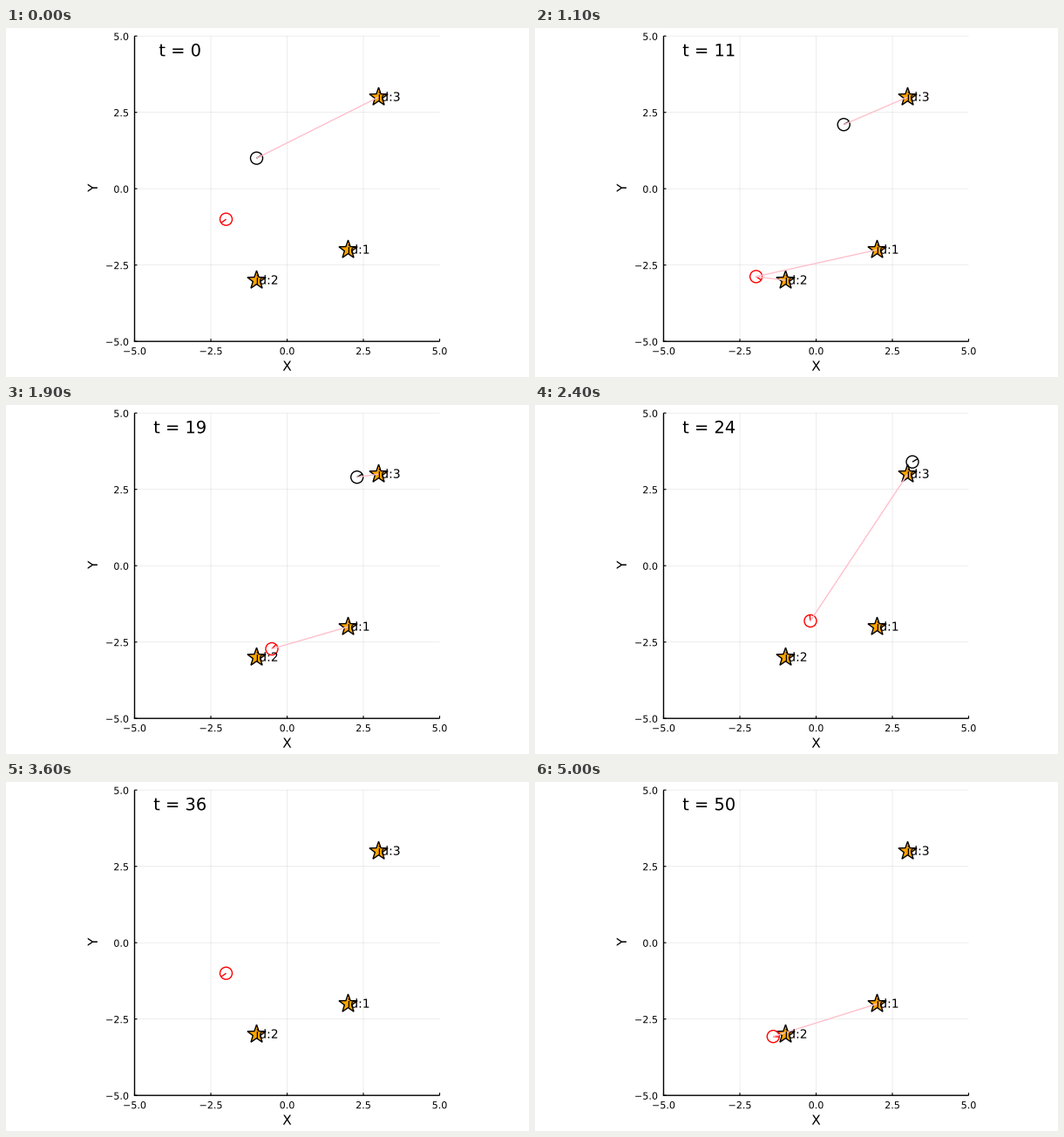
A matplotlib script that plays this animation: 600x400 px, repeating every 5100 ms.

```python
import math

import matplotlib.pyplot as plt
import numpy as np
from matplotlib.animation import FuncAnimation
from matplotlib.collections import LineCollection
from matplotlib.patches import Circle, PathPatch, Polygon, Rectangle
from matplotlib.textpath import TextPath
from matplotlib.transforms import Affine2D

plt.rcParams["font.family"] = "DejaVu Sans"

W, H, DPI = 600, 400, 100
FRAMES, INTERVAL = 51, 100
CX, CY, SCALE = 322.5, H - 184.2, 35      # pixel centre and pixels per unit
PT = DPI / 72
CAP = 0.729                               # digit height in em

LANDMARKS = [(2, -2), (-1, -3), (3, 3)]
RADIUS = 0.2
NEAR, FAR, HALF_VIEW = 0.5, 6.0, math.pi / 3

fig = plt.figure(figsize=(W / DPI, H / DPI), dpi=DPI, facecolor="white")
ax = fig.add_axes([0, 0, 1, 1])
ax.set_xlim(0, W)
ax.set_ylim(0, H)
ax.axis("off")


def px(x, y):
    return CX + SCALE * x, CY + SCALE * y


def text_path(s, x, y, pt, align=0.5, angle=0):
    """Outline of s, digits centred on y, anchored at share `align` of its width."""
    size = pt * PT

    def right(t):
        return TextPath((0, 0), t, size=size).get_extents().x1

    width = right(s + "|") - right("|")
    place = Affine2D().translate(-align * width, -CAP * size / 2)
    place.rotate_deg(angle).translate(x, y)
    return place.transform_path(TextPath((0, 0), s, size=size))


def add_text(*args, **kw):
    patch = PathPatch(text_path(*args, **kw), fc="black", lw=0, zorder=8)
    return ax.add_patch(patch)


def line(p, q, **kw):
    kw = {"color": "black", "lw": 1, "solid_capstyle": "butt", "snap": False, **kw}
    return ax.plot([p[0], q[0]], [p[1], q[1]], **kw)[0]


def number(v):
    return f"{v:.1f}".replace("-", "\u2212")


def draw_axes():
    left, bottom = px(-5, -5)
    right, top = px(5, 5)
    grid = {"lw": 0.5, "alpha": 0.1, "zorder": 1}
    for v in np.linspace(-5, 5, 5):
        x, y = px(v, v)
        if abs(v) < 5:
            line((x, bottom), (x, top), **grid)
        if v > -5:
            line((left, y), (right, y), **grid)
        line((x, bottom), (x, bottom + 3), lw=0.8, zorder=2)
        line((left, y), (left + 3, y), lw=0.8, zorder=2)
        add_text(number(v), x, H - 370.2, 8)
        add_text(number(v), 141, y - 0.5, 8, align=1)
    line((left - 0.7, bottom), (right, bottom), zorder=2)
    line((left, bottom), (left, top), zorder=2)
    add_text("X", CX, H - 387.1, 11)
    add_text("Y", 99.3, CY + 1, 11, angle=90)


def draw_landmarks():
    angles = math.pi / 2 + np.arange(10) * math.pi / 5
    radii = 8 * PT * np.where(np.arange(10) % 2, 0.4, 1)
    star = np.column_stack([radii * np.cos(angles), radii * np.sin(angles)])
    for i, mark in enumerate(LANDMARKS, 1):
        x, y = px(*mark)
        ax.add_patch(Polygon(star + (x, y), fc="orange", ec="black", lw=1, zorder=3))
        add_text(f"id:{i}", x + 12, y + 0.6, 10)


class Robot:
    def __init__(self, x, y, heading, speed, turn, color, clip):
        self.start = x, y, heading
        self.speed, self.turn = speed, turn
        self.body = Circle((0, 0), RADIUS * SCALE, fill=False, ec=color, lw=1, zorder=4)
        ax.add_patch(self.body)
        self.nose = line((0, 0), (0, 0), color=color, zorder=4)
        self.rays = LineCollection([], colors="pink", linewidths=1, zorder=5)
        ax.add_collection(self.rays, autolim=False)
        self.artists = [self.body, self.nose, self.rays]
        for artist in self.artists:
            artist.set_clip_path(clip)

    def pose(self, t):
        x, y, a = self.start
        if self.turn == 0:
            d = self.speed * t
            return x + d * math.cos(a), y + d * math.sin(a), a
        r, b = self.speed / self.turn, a + self.turn * t
        return (x + r * (math.sin(b) - math.sin(a)),
                y + r * (math.cos(a) - math.cos(b)), b)

    def show(self, t):
        x, y, a = self.pose(t)
        centre = px(x, y)
        tip = px(x + RADIUS * math.cos(a), y + RADIUS * math.sin(a))
        self.body.center = centre
        self.nose.set_data(*zip(centre, tip))
        self.rays.set_segments([
            [centre, px(*mark)] for mark in LANDMARKS if sees(x, y, a, mark)
        ])
        return self.artists


def sees(x, y, a, mark):
    dx, dy = mark[0] - x, mark[1] - y
    bearing = (math.atan2(dy, dx) - a + math.pi) % (2 * math.pi) - math.pi
    return NEAR <= math.hypot(dx, dy) <= FAR and abs(bearing) <= HALF_VIEW


draw_axes()
draw_landmarks()
area = Rectangle(px(-5, -5), 10 * SCALE, 10 * SCALE, transform=ax.transData)
robots = [
    Robot(-1, 1, math.pi / 6, 0.2, 0, "black", area),
    Robot(-2, -1, math.pi * 6 / 5, 0.2, math.radians(10), "red", area),
]


def clock_path(t):
    return text_path(f"t = {t}", 199.7, H - 25.2, 14)


clock = ax.add_patch(PathPatch(clock_path(0), fc="black", lw=0, zorder=8))


def update(t):
    clock.set_path(clock_path(t))
    return [clock] + [artist for robot in robots for artist in robot.show(t)]


anim = FuncAnimation(fig, update, frames=FRAMES, interval=INTERVAL,
                     repeat=True, repeat_delay=0, blit=False)
plt.show()
```
